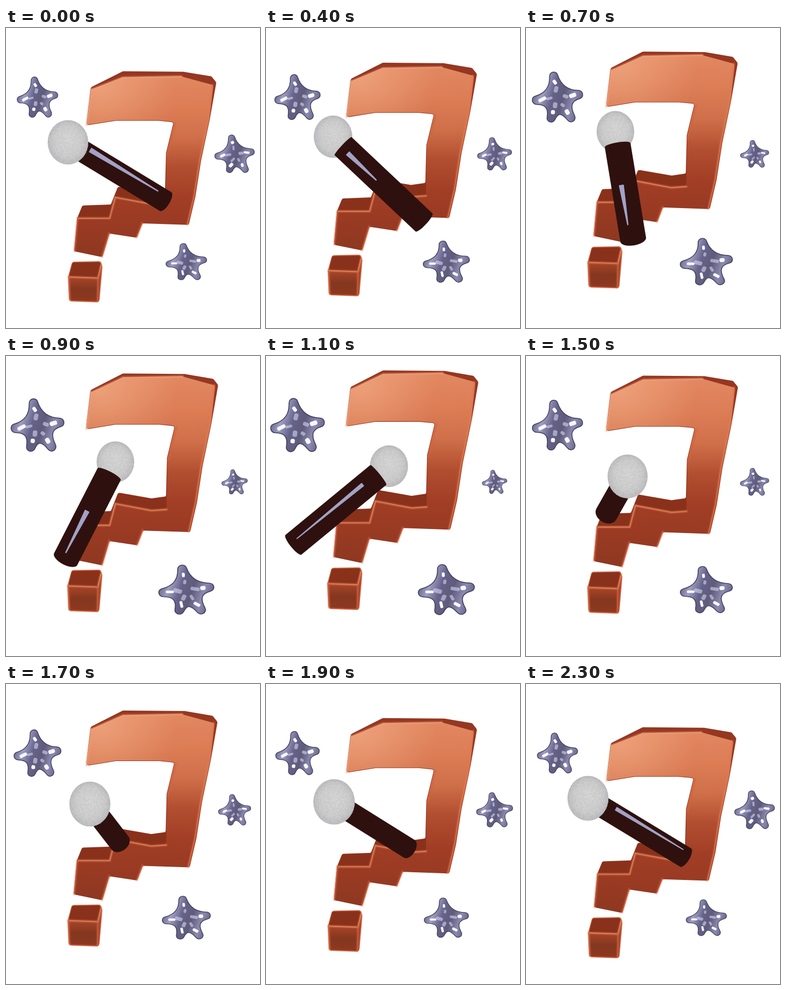
Write an HTML page with a canvas that moves like this. It is 500 px wide and 588 px high and loops after 2.4 s.

```html
<!DOCTYPE html>
<html lang="en">
<head>
<meta charset="utf-8">
<title>Question mark and microphone</title>
<style>
html, body { margin: 0; width: 100%; height: 100%; overflow: hidden; background: #fff; }
canvas { display: block; }
</style>
</head>
<body>
<canvas id="stage" width="500" height="588"></canvas>
<script>
const ctx = document.getElementById('stage').getContext('2d');
const LOOP = 2400, STEP = 100, TAU = 2 * Math.PI;

// Cosine over the loop, 1 at the peak time
const swing = (t, peak) => Math.cos((t - peak) / LOOP * TAU);
// 0 at the low time, 1 half a loop later
const wave = (t, low) => (1 - swing(t, low)) / 2;
const random = seed => Math.abs(Math.sin(seed * 127.1) * 43758.5) % 1;

function stops(gradient, ...colors) {
  colors.forEach((c, i) => gradient.addColorStop(i / (colors.length - 1), c));
  return gradient;
}

// Closed polygon with rounded corners
function shape(pts, radius, fill) {
  const n = pts.length, [ax, ay] = pts[n - 1], [bx, by] = pts[0];
  ctx.beginPath();
  ctx.moveTo((ax + bx) / 2, (ay + by) / 2);
  pts.forEach((p, i) => ctx.arcTo(...p, ...pts[(i + 1) % n], radius));
  ctx.closePath();
  ctx.fillStyle = fill;
  ctx.fill();
}

// Glossy edge: a wide faint stroke below a narrow bright one
function gloss(pts, color) {
  ctx.strokeStyle = color;
  for (const [width, alpha] of [[6, .25], [1.8, .8]]) {
    ctx.globalAlpha = alpha;
    ctx.lineWidth = width;
    ctx.beginPath();
    pts.forEach(p => ctx.lineTo(...p));
    ctx.stroke();
  }
  ctx.globalAlpha = 1;
}

function drawMark(t) {
  const u = wave(t, -40), sx = 1 + .019 * u, sy = 1 + .037 * u;
  const crest = [[168, 121], [230, 97 - 5 * u], [345, 95 - 5 * u], [408, 112 - 5 * u]];
  const rim = [[168, 117], [230, 86], [350, 87], [404, 96], [413, 107]];
  const right = [[400, 180], [383, 260], [372, 330], [359, 385]];
  const steps = [[268, 382], [257, 410], [203, 402], [189, 448], [135, 437], [141, 373]];
  const inner = [[314, 319], [316, 245], [331, 184], [300, 181], [215, 181], [159, 190]];
  const back = [[151, 349], [207, 347], [221, 312], [285, 323], inner[0]];
  const front = [[142, 373], [204, 373], [215, 332], [285, 345], [314, 343]];
  const side = '#8a311b', glow = '#ef8f63', dim = '#cf6440';

  ctx.save();
  ctx.lineJoin = ctx.lineCap = 'round';
  ctx.transform(sx, 0, 0, sy, 200 * (1 - sx), 86 - 57 * u - 86 * sy);

  shape([...rim, ...right, ...steps, ...back, ...inner.slice(1)], 4, '#963721');
  ctx.strokeStyle = '#963721';
  ctx.lineWidth = 2;
  ctx.stroke();

  const face = [...crest, ...right, ...steps, ...front.slice(1), ...inner.slice(1)];
  shape(face, 4, stops(ctx.createLinearGradient(0, 95, 0, 450),
    '#e28760', '#dc7d56', '#d0704a', '#b24e30', '#a13e25', '#993a23', '#8e3821'));
  shape(face, 4, stops(ctx.createRadialGradient(185, 115, 0, 185, 115, 150), '#ffc8a266', '#ffc8a200'));
  shape([...back, ...front.slice().reverse()], 1, side);

  gloss(crest.slice(0, 3), '#eda079');
  gloss([inner[5], crest[0]], '#eda079');
  gloss([crest[3], ...right].map(([x, y]) => [x - 2, y]), '#de7a50');
  gloss(inner.slice(1, 3).map(([x, y]) => [x + 2, y + 3]), dim);
  gloss(front, glow);
  gloss(steps.slice(0, 2), dim);
  gloss(steps.slice(2, 4), dim);
  gloss(steps.slice(4), dim);

  // Dot of the question mark
  const [tl, tr, br, bl] = [[124, 488], [181, 490], [180, 535], [126, 533]];
  shape([[131, 459], [186, 458], [189, 468], [183, 537], [125, 535], [123, 488]], 5, '#a4432a');
  ctx.stroke();
  shape([tl, tr, br, bl], 4, stops(ctx.createLinearGradient(0, 488, 0, 536), '#a84529', '#84371f', '#8f3820'));
  shape([[131, 460], [186, 459], tr, tl], 4, side);
  gloss([tl, tr, [187, 466]], glow);
  gloss([tr, br], dim);
  gloss([tl, bl], dim);
  ctx.restore();
}

const tips = [[-.18, -1], [1, -.13], [.64, .96], [-.3, .97], [-1, .13]];
const stars = [
  { x: 62, y: 136, size: 40, grow: 13.2, squash: 1 },
  { x: 450, y: 247, size: 39.5, grow: -15, squash: .96 },
  { x: 355, y: 458.5, size: 40, grow: 15.5, squash: .9 },
];

function drawStar({ x, y, size, grow, squash }, t, seed) {
  const r = size + grow * wave(t, -105), pull = .13;
  const p = tips.map(tip => tip.map(v => v * .83));
  ctx.save();
  ctx.translate(x, y);
  ctx.scale(r, r * squash);
  ctx.beginPath();
  ctx.moveTo(...p[0]);
  p.forEach(([ax, ay], i) => {
    const [bx, by] = p[(i + 1) % 5];
    ctx.quadraticCurveTo((ax + bx) * pull, (ay + by) * pull, bx, by);
  });
  ctx.closePath();
  ctx.lineJoin = 'round';
  ctx.lineWidth = .36;
  ctx.strokeStyle = '#454260';
  ctx.stroke();
  ctx.lineWidth = .29;
  ctx.fillStyle = ctx.strokeStyle = stops(ctx.createLinearGradient(-1, -.3, 1, .3),
    '#5f5c7e', '#9f9ec2', '#66638a', '#5e5b7b', '#8c8aaf', '#605d7e');
  ctx.stroke();
  ctx.fill();
  // Shine: a bright patch on each arm, a paler one nearer the middle
  for (let i = 0; i < 10; i++) {
    const [px, py] = p[i % 5], inside = i > 4, d = inside ? .38 : .72;
    const k = seed * 20 + i, w = .16 + .18 * random(k), h = .1 + .08 * random(k + .5);
    ctx.save();
    ctx.translate(px * d, py * d);
    ctx.rotate(Math.atan2(py, px) + random(k + .3) - .5);
    ctx.fillStyle = inside ? '#cfcfeaa0' : '#f6f6ff';
    ctx.beginPath();
    ctx.roundRect(-w / 2, -h / 2, w, h, h * .4);
    ctx.fill();
    ctx.restore();
  }
  ctx.restore();
}

// time, ball x and y, tail of the handle relative to the ball
const poses = [
  [0, 122, 224, 192, 116],
  [400, 132, 213, 179, 168],
  [700, 176, 203, 35, 212],
  [1100, 242, 216, -188, 154],
  [1500, 200, 236, -42, 74],
  [1900, 134, 231, 148, 92],
];
poses.push([2300, ...poses[0].slice(1)]);

// Smooth closed curve through the poses
function poseAt(t) {
  const n = poses.length, i = poses.findLastIndex(p => p[0] <= t);
  const [a, b, c, d] = [i - 1, i, i + 1, i + 2].map(k => {
    const [time, ...rest] = poses[(k + n) % n];
    return [time + LOOP * Math.floor(k / n), ...rest];
  });
  const span = c[0] - b[0], f = (t - b[0]) / span, g = 1 - f;
  return b.map((v, k) => {
    const m0 = (c[k] - a[k]) / (c[0] - a[0]) * span;
    const m1 = (d[k] - v) / (d[0] - b[0]) * span;
    return g * g * ((1 + 2 * f) * v + f * m0) + f * f * ((1 + 2 * g) * c[k] - g * m1);
  }).slice(1);
}

function drawBall(x, y, near) {
  const r = 39 - 2 * near;
  ctx.save();
  ctx.translate(x, y);
  ctx.scale(r, r * 1.09);
  ctx.fillStyle = stops(ctx.createRadialGradient(.05, -.15, .1, 0, 0, 1), '#d2d2d2', '#cfcfcf', '#cacaca', '#b9b9bd');
  ctx.beginPath();
  ctx.arc(0, 0, 1, 0, TAU);
  ctx.fill();
  // Foam grain
  for (let i = 1; i < 500; i++) {
    const a = i * 2.4, d = Math.sqrt(i / 510);
    ctx.fillStyle = random(i) > .5 ? '#e2e2e260' : '#aaaab060';
    ctx.fillRect(Math.cos(a) * d, Math.sin(a) * d, .035, .035);
  }
  ctx.restore();
}

function drawHandle(x, y, dx, dy, near, t) {
  const len = Math.hypot(dx, dy), half = 23 + 2.7 * near;
  // The shorter the handle looks, the rounder its end
  const cap = half * .8 * Math.sqrt(Math.max(0, 1 - (len / 255) ** 2));
  ctx.save();
  ctx.translate(x, y);
  ctx.rotate(Math.atan2(dy, dx));
  ctx.fillStyle = '#2e110e';
  ctx.beginPath();
  ctx.ellipse(len, 0, cap, half, 0, -TAU / 4, TAU / 4);
  ctx.ellipse(27, 0, cap / 2, half, 0, TAU / 4, TAU * .75);
  ctx.fill();

  // Light sliding along the handle
  const light = swing(t, 500), w = 5 * Math.min(1, 2 * light + .8);
  if (w > 0) {
    const mid = .55 - .25 * Math.sin(2 * t / LOOP * TAU), reach = .42 - .27 * Math.max(0, light);
    const from = len * Math.max(.13, mid - reach), to = len * Math.min(.95, mid + reach);
    const off = 9 * Math.tanh(2 * near) - 3;
    shape([[from, off - w], [to, off - w / 4], [to, off + w / 4], [from, off + w]], 1, '#a3a2c6');
  }
  ctx.restore();
}

function drawMic(t) {
  const [x, y, dx, dy] = poseAt(t), near = swing(t, 800);
  const parts = [() => drawHandle(x, y, dx, dy, near, t), () => drawBall(x, y, near)];
  // The handle passes in front while it points at the viewer
  if (near > 0) parts.reverse();
  parts.forEach(draw => draw());
}

function frame() {
  const t = Math.floor(performance.now() % LOOP / STEP) * STEP;
  ctx.clearRect(0, 0, 500, 588);
  drawMark(t);
  stars.forEach((star, i) => drawStar(star, t, i + 1));
  drawMic(t);
  requestAnimationFrame(frame);
}
frame();
</script>
</body>
</html>
```
